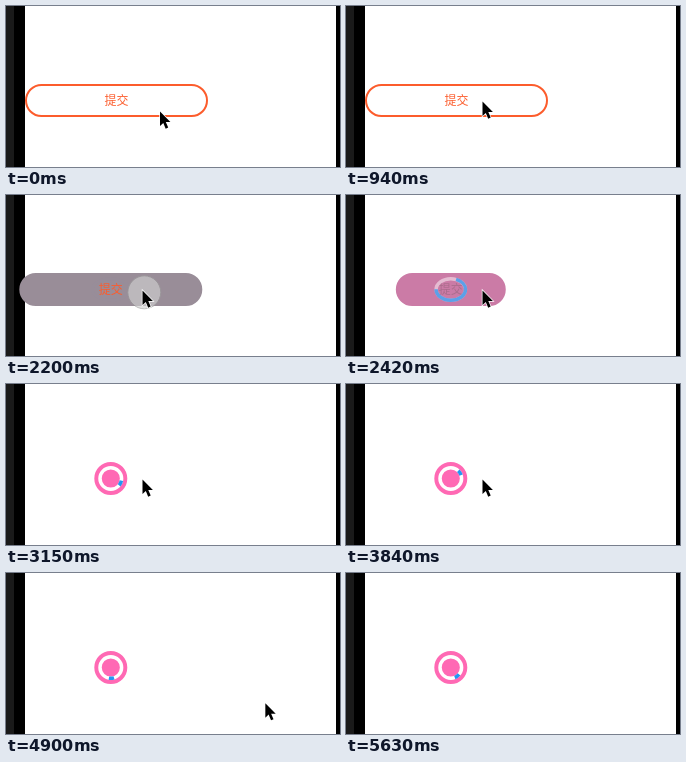
Recreate the animation shown at these times as an HTML page. Size 334 by 161 pixels, loop 5730 ms.

```html
<!DOCTYPE html>
<html lang="zh">
<head>
<meta charset="utf-8">
<style>
html, body { margin: 0; width: 100%; height: 100%; overflow: hidden; background: #fff; }
svg { display: block; }
text { font: 500 12px "Noto Sans CJK SC", "Noto Sans CJK", sans-serif; text-anchor: middle; }
</style>
</head>
<body>
<svg width="334" height="161" viewBox="0 0 334 161">
  <rect width="334" height="161" fill="#fff"/>
  <rect width="19" height="161"/>
  <rect width="8" height="161" fill="#1a1a1a"/>
  <rect x="330" width="4" height="161"/>
  <rect id="button" stroke-width="2"/>
  <text id="label" y="99">提交</text>
  <g fill="none" stroke-width="3.5">
    <ellipse id="track" cx="104.8" cy="94.5" stroke="#fff"/>
    <ellipse id="arc" cx="104.8" cy="94.5" stroke="#2196f3" pathLength="360"/>
  </g>
  <circle id="touch" cx="138.3" cy="97.3" r="16.5" fill="#d0d0d0" stroke="#999"/>
  <path id="cursor" d="M0 0V14.5L3.3 11.4 5.7 17.2 8.2 16.1 5.8 10.5H10.4Z" stroke="#fff" stroke-width="1.4" paint-order="stroke"/>
</svg>
<script>
const LOOP = 5730, STEP = 56, PRESS = 2080, COLLAPSE = 2190;
const ORANGE = [252, 92, 44], GREY = [153, 141, 152], PINK = [255, 105, 180], MAUVE = [138, 96, 118];

// Pointer positions: time, x, y
const POINTER = [
  [480, 154, 105.5], [710, 122, 84], [940, 136.5, 95.5],
  [3880, 136.5, 95.5], [4150, 112, 107], [4376, 107.5, 104.5], [4432, 148, 72],
  [4720, 230, 112], [5020, 285, 146], [5130, 290, 157], [5190, 292, 175]
];

const $ = id => document.getElementById(id);
const clamp = v => Math.max(0, Math.min(1, v));
const smooth = v => v * v * (3 - 2 * v);
const lerp = (a, b, p) => a + (b - a) * p;
const mix = (a, b, p) => `rgb(${a.map((v, i) => Math.round(lerp(v, b[i], p)))})`;
const set = (id, attrs) => {
  for (const name in attrs) $(id).setAttribute(name, attrs[name]);
};

function snap(t) {
  if (t < 480) return 0;
  if (t < PRESS) return Math.min(940, 480 + Math.floor((t - 480) / 57.5 + 1) * 57.5);
  return PRESS + Math.min(63, Math.floor((t - PRESS) / STEP)) * STEP;
}

function pointerAt(t) {
  const i = POINTER.findIndex(k => k[0] > t);
  if (i === 0) return POINTER[0].slice(1);
  if (i < 0) return POINTER.at(-1).slice(1);
  const [t0, x0, y0] = POINTER[i - 1], [t1, x1, y1] = POINTER[i];
  const p = (t - t0) / (t1 - t0);
  return [lerp(x0, x1, p), lerp(y0, y1, p)];
}

function draw(t) {
  const loading = t > COLLAPSE;
  const p = smooth(clamp((t - COLLAPSE) / 460));
  const cx = loading ? 104.8 : 110.5;
  const width = lerp(183, 33, p);
  const fill = mix(GREY, PINK, p);

  set("button", {
    x: cx - width / 2 + 1, y: 79, width: width - 2, height: 31, rx: 15.5,
    fill: loading ? fill : "#fff",
    stroke: loading ? fill : mix(ORANGE, ORANGE, 0)
  });
  set("label", { x: cx, fill: mix(ORANGE, MAUVE, clamp(2 * p)), opacity: 1 - p });

  const rx = 10.8 + (width - 33) / 75 * 3.8, ry = 10.8;
  const extent = lerp(360, 28, p ** 1.5);
  const angle = 28 + 0.45 * (t - 3150);
  set("track", { rx, ry, opacity: p });
  set("arc", {
    rx, ry, opacity: Math.sqrt(p),
    "stroke-dasharray": `${extent} ${360 - extent}`,
    "stroke-dashoffset": extent / 2 - angle
  });

  set("touch", { opacity: t < PRESS ? 0 : 0.95 * clamp((2300 - t) / 160) });
  set("cursor", { transform: `translate(${pointerAt(t)})` });
}

function tick(now) {
  draw(snap(now % LOOP));
  requestAnimationFrame(tick);
}
draw(0);
requestAnimationFrame(tick);
</script>
</body>
</html>
```
